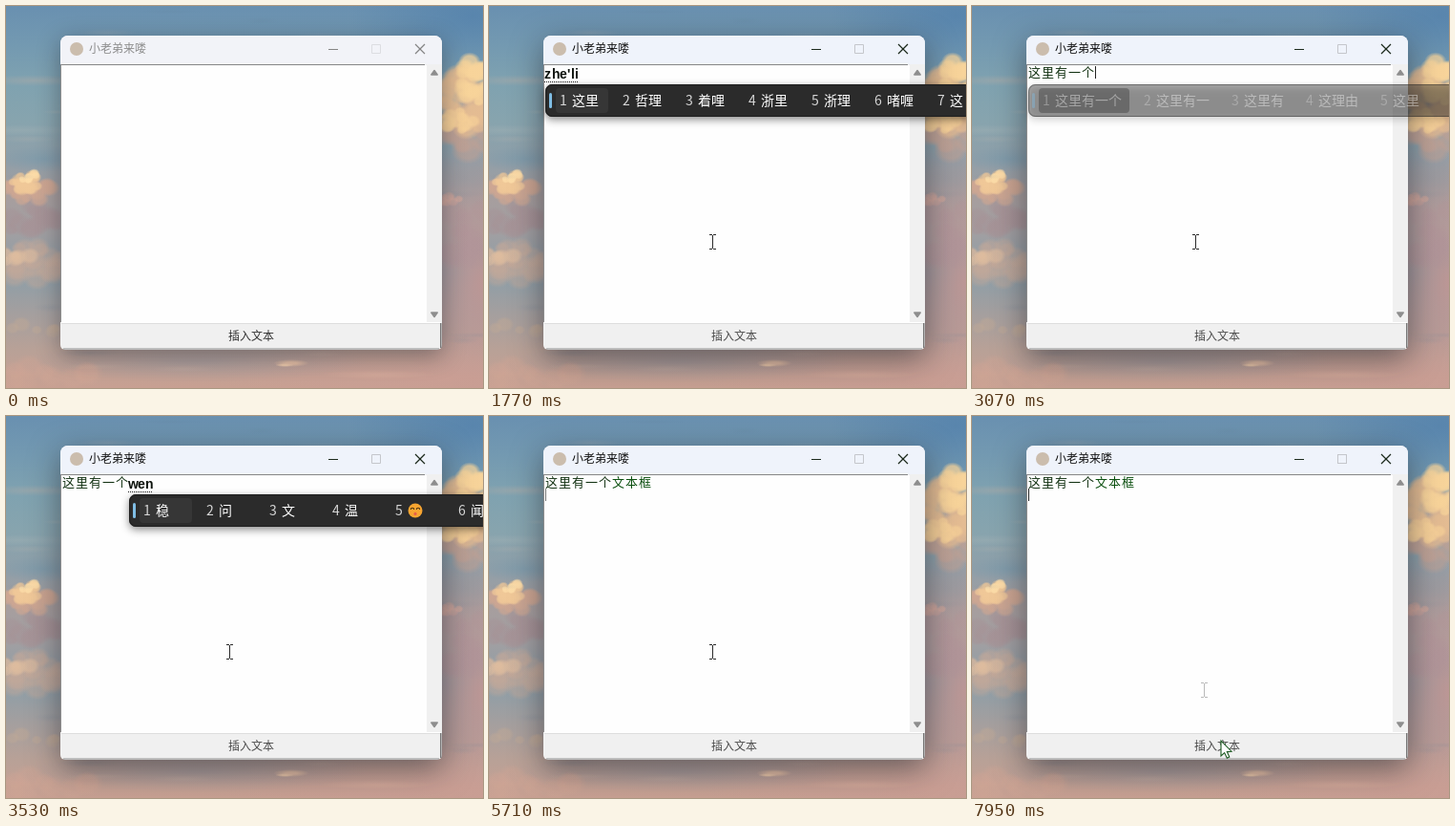
An HTML page with a canvas for the animation above (8000 ms loop, 500 px wide and 400 px high).

```html
<!DOCTYPE html>
<html lang="zh-CN">
<head>
<meta charset="utf-8">
<style>
html, body { margin: 0; width: 100%; height: 100%; overflow: hidden; background: #7d9cae; }
canvas { display: block; width: 500px; height: 400px; }
</style>
</head>
<body>
<canvas id="stage" width="500" height="400"></canvas>
<script>
const W = 500, H = 400, LOOP = 8000;
const ctx = document.getElementById('stage').getContext('2d');
const CJK = '"Noto Sans CJK SC", "Noto Sans CJK", sans-serif';
const clamp = v => Math.max(0, Math.min(1, v));
const lerp = (a, b, k) => a + (b - a) * k;

function rect(c, x, y, w, h, color) {
  c.fillStyle = color;
  c.fillRect(x, y, w, h);
}

function round(x, y, w, h, r, color) {
  ctx.fillStyle = color;
  ctx.beginPath();
  ctx.roundRect(x, y, w, h, r);
  ctx.fill();
}

function line(color, width, ...pts) {
  ctx.strokeStyle = color;
  ctx.lineWidth = width;
  ctx.beginPath();
  pts.forEach(([x, y], i) => i ? ctx.lineTo(x, y) : ctx.moveTo(x, y));
  ctx.stroke();
}

function text(s, x, y, size, color, spacing = 0) {
  ctx.font = `${size}px ${CJK}`;
  ctx.letterSpacing = spacing + 'px';
  ctx.fillStyle = color;
  ctx.fillText(s, x, y);
  ctx.letterSpacing = '0px';
}

// ---- painted sky ----
function makeSky() {
  const cv = document.createElement('canvas');
  cv.width = W;
  cv.height = H;
  const c = cv.getContext('2d');
  let seed = 11;
  const rnd = () => (seed = (seed * 16807) % 2147483647) / 2147483647;

  const g = c.createLinearGradient(0, 0, 0, H);
  ['#6990b0', '#7399b1', '#7fa2b0', '#87a4ae', '#8f9fa9', '#a79e9e', '#a09fa2',
   '#8c9ea8', '#a39f9f', '#b8a197', '#c8a092'].forEach((col, i) => g.addColorStop(i / 10, col));
  rect(c, 0, 0, W, H, g);

  function blob(x, y, rx, ry, rgb, a, hard = 0) {
    c.save();
    c.translate(x, y);
    c.scale(rx, ry);
    const r = c.createRadialGradient(0, 0, hard, 0, 0, 1);
    r.addColorStop(0, `rgba(${rgb},${a})`);
    r.addColorStop(1, `rgba(${rgb},0)`);
    c.fillStyle = r;
    c.beginPath();
    c.arc(0, 0, 1, 0, 7);
    c.fill();
    c.restore();
  }

  // cluster of overlapping dabs
  function puff(x, y, w, h, n, rgb, size, a) {
    for (let i = 0; i < n; i++) {
      const q = rnd() * 6.28, d = Math.sqrt(rnd()), s = size * (0.6 + rnd() * 0.7);
      blob(x + Math.cos(q) * d * w, y + Math.sin(q) * d * h, s * 1.2, s, rgb, a, 0.6);
    }
  }

  blob(490, 10, 130, 70, '84,130,172', 0.8);
  blob(500, 290, 90, 150, '190,150,148', 0.95);
  blob(480, 180, 60, 35, '150,152,158', 0.6);
  blob(460, 390, 240, 45, '203,158,148', 0.8);
  blob(200, 372, 180, 22, '150,150,158', 0.5);
  blob(30, 78, 55, 6, '160,168,170', 0.7);
  blob(15, 130, 60, 6, '152,172,178', 0.7);
  blob(40, 160, 50, 14, '118,152,170', 0.6);

  puff(18, 222, 40, 14, 16, '166,146,150', 11, 0.5);
  puff(22, 192, 24, 12, 20, '205,166,146', 8, 0.7);
  puff(22, 184, 17, 10, 18, '240,200,152', 6, 0.75);
  puff(24, 180, 10, 6, 8, '252,220,168', 4, 0.8);
  puff(25, 270, 36, 18, 20, '196,168,152', 11, 0.45);
  puff(10, 262, 18, 7, 8, '222,188,158', 7, 0.6);
  puff(20, 338, 42, 5, 9, '190,168,150', 7, 0.5);
  puff(30, 386, 70, 10, 12, '206,164,148', 12, 0.4);

  puff(484, 122, 32, 32, 30, '190,160,148', 12, 0.6);
  puff(486, 100, 26, 32, 34, '228,188,146', 10, 0.7);
  puff(492, 78, 16, 24, 22, '248,212,154', 8, 0.75);
  puff(476, 122, 16, 12, 14, '246,208,152', 6, 0.7);
  puff(466, 203, 9, 5, 7, '210,166,154', 5, 0.6);
  puff(486, 240, 25, 35, 14, '176,148,152', 13, 0.35);

  blob(299, 374, 19, 4, '228,190,164', 0.9, 0.3);
  blob(292, 376, 10, 2, '240,204,172', 0.8, 0.3);
  blob(390, 386, 60, 5, '216,172,156', 0.6);
  for (let i = 0; i < 60; i++) {
    blob(rnd() * W, rnd() * H, 14 + rnd() * 30, 2 + rnd() * 3,
      i % 2 ? '225,200,180' : '95,125,150', 0.12);
  }
  return cv;
}
const sky = makeSky();

// ---- window ----
function drawWindow(active) {
  ctx.save();
  ctx.shadowColor = active ? 'rgba(20,20,30,.5)' : 'rgba(20,20,30,.4)';
  ctx.shadowBlur = active ? 32 : 24;
  ctx.shadowOffsetY = active ? 9 : 6;
  round(57, 31, 400, 329, [8, 8, 5, 5], '#f0f0f0');
  ctx.restore();
  round(57, 31, 400, 30, [8, 8, 0, 0], active ? '#eff3fb' : '#f2f3f8');

  ctx.fillStyle = '#cbbdad';
  ctx.beginPath();
  ctx.arc(74, 45, 7, 0, 7);
  ctx.fill();
  text('小老弟来喽', 87, 49, 12, active ? '#111' : '#8c8c8c');

  const ink = active ? '#1c2a1c' : '#858585';
  line(ink, 1, [338, 45.5], [348, 45.5]);
  ctx.strokeStyle = active ? '#c4c6cb' : '#dcdde1';
  ctx.strokeRect(383.5, 40.5, 9, 9);
  line(ink, 1.15, [429, 40], [439, 50]);
  line(ink, 1.15, [439, 40], [429, 50]);

  rect(ctx, 58, 62, 383, 269, '#fefefe');
  rect(ctx, 57, 61, 382, 1, '#868686');
  rect(ctx, 57, 61, 1, 270, '#8d8d8d');
  rect(ctx, 441, 62, 16, 269, '#f0f0f0');
  for (const [y, d] of [[70, -1], [323, 1]]) {
    ctx.fillStyle = ctx.strokeStyle = '#8e8e8e';
    ctx.lineWidth = 1.5;
    ctx.lineJoin = 'round';
    ctx.beginPath();
    ctx.moveTo(445.8, y - d * 2);
    ctx.lineTo(452.2, y - d * 2);
    ctx.lineTo(449, y + d * 2.5);
    ctx.closePath();
    ctx.fill();
    ctx.stroke();
  }

  rect(ctx, 58, 331, 398, 1, '#fff');
  rect(ctx, 58, 332, 398, 1, '#dedede');
  rect(ctx, 455, 332, 1.5, 26, '#787878');
  rect(ctx, 60, 358.5, 394, 1, '#8c8c8c');
  text('插入文本', 233, 350, 12, active ? '#4c4c4c' : '#333');
}

// ---- input method ----
// [start, typed letters, candidates]
const FIRST = [
  [1060, 'z', '在 这 中 做 再 着 最'],
  [1210, 'zh', '这 中 只 找 着 真 种'],
  [1360, 'zhe', '这 着 者 折 哲 浙 遮'],
  [1530, "zhe'l", '这里 这类 这两 折了 这 着 者'],
  [1690, "zhe'li", '这里 哲理 着哩 浙里 浙理 啫喱 这'],
  [1910, "zhe'li'y", '这里有 这里 哲理 着哩 浙里 浙理'],
  [2030, "zhe'li'yo", '这里有 这里 哲理 着哩 浙里 浙理'],
  [2160, "zhe'li'you", '这里有 这理由 这里 哲理 着哩 浙里'],
  [2390, "zhe'li'you'y", '这里有一 这里有 这理由 这里 哲理'],
  [2460, "zhe'li'you'yi", '这里有一 _ 这里有一个 这里有 这理由 这里'],
  [2690, "zhe'li'you'yi'g", '这里有一个 这里有一 这里有 这理由 这里'],
  [2840, "zhe'li'you'yi'ge", '这里有一个 这里有一 这里有 这理由 这里']
];
const SECOND = [
  [3200, 'w', '我 为 无 问 万 外 完'],
  [3330, 'we', '我 为 未 位 文 问 委'],
  [3450, 'wen', '稳 问 文 温 @ 闻 吻'],
  [3620, "wen'b", '文本 稳吧 问吧 稳 问 文'],
  [3700, "wen'be", '文本 问本 稳 问 文 温'],
  [3780, "wen'ben", '文本 问本 稳 问 文 温'],
  [4080, "wen'ben'k", '文本框 文本库 文本 稳 问 文']
];
const advance = ch => ch === 'w' ? 10 : "'li".includes(ch) ? 4 : 8;

function drawLetters(s, x) {
  const start = x;
  ctx.font = 'bold 14px "Liberation Sans", Arial, sans-serif';
  ctx.fillStyle = '#0c120c';
  for (const ch of s) {
    ctx.fillText(ch, x, 76);
    x += advance(ch);
  }
  for (let i = start; i < x; i += 2) rect(ctx, i, 79, 1, 1, '#222');
  return x;
}

function drawFace(x, y) {
  ctx.fillStyle = '#f7a531';
  ctx.beginPath();
  ctx.arc(x, y, 7.5, 0, 7);
  ctx.fill();
  ctx.strokeStyle = '#4a3212';
  ctx.lineWidth = 1.1;
  for (const dx of [-3, 3]) {
    ctx.beginPath();
    ctx.arc(x + dx, y - 1, 1.7, Math.PI, 0);
    ctx.stroke();
  }
  ctx.fillStyle = '#e5604b';
  ctx.beginPath();
  ctx.arc(x, y + 3.4, 1.6, 0, 7);
  ctx.fill();
}

function drawPopup(x, list, alpha) {
  if (alpha <= 0) return;
  ctx.save();
  ctx.globalAlpha = alpha;
  ctx.save();
  ctx.shadowColor = 'rgba(0,0,0,.45)';
  ctx.shadowBlur = 9;
  ctx.shadowOffsetY = 3;
  round(x, 82, 560, 34, 7, '#2b2b2b');
  ctx.restore();
  ctx.strokeStyle = '#1e1e1e';
  ctx.lineWidth = 1;
  ctx.beginPath();
  ctx.roundRect(x + 0.5, 82.5, 560, 33, 7);
  ctx.stroke();
  let nx = x + 15;
  list.split(' ').forEach((word, i) => {
    const pitch = Math.max(66, 36 + 14 * word.length);
    if (!i) {
      round(x + 11, 86, pitch - 11, 26, 4, '#363636');
      round(x + 4, 91, 3, 16, 1.5, '#7fbde4');
    }
    text(i + 1, nx, 104, 14, '#d6d6d6');
    if (word === '@') drawFace(nx + 21, 99);
    else if (word !== '_') text(word, nx + 13, 104, 14, '#fff');
    nx += pitch;
  });
  ctx.restore();
}

function compose(t, steps, x, end) {
  if (t < steps[0][0] || t > end + 120) return;
  const [, letters, list] = steps.filter(s => s[0] <= t).pop();
  if (t < end) {
    const right = drawLetters(letters, x);
    if (t >= 4370) rect(ctx, right, 64, 1, 16, '#111');
  }
  drawPopup(x + 1, list, Math.min(clamp((t - steps[0][0] + 20) / 90), clamp((end + 120 - t) / 120)));
}

// ---- caret and pointer ----
function drawCaret(t) {
  if (t >= 390 && t < 1060) {
    if (t < 700 || t >= 920) rect(ctx, 59, 63, 1, 13, '#222');
  } else if (t >= 3000 && t < 3200) {
    rect(ctx, 129, 63, 1, 13, '#222');
  } else if (t >= 4550) {
    const on = (t - 4760 + 900) % 900 < 580 || t < 4760;
    if (!on) return;
    if (t < 4990) rect(ctx, 171, 63, 1, 13, '#222');
    else rect(ctx, 59, 76, 1, 13, t > 5600 && t < 6300 ? '#777' : '#222');
  }
}

function drawBeam(x, y, color) {
  for (const d of [-8, 7]) {
    rect(ctx, x - 3, y + d, 3, 1, color);
    rect(ctx, x + 1, y + d, 3, 1, color);
  }
  rect(ctx, x, y - 7, 1, 14, color);
}

function drawArrow(x, y) {
  ctx.fillStyle = '#fff';
  ctx.strokeStyle = '#1d5b22';
  ctx.lineWidth = 1.1;
  ctx.lineJoin = 'miter';
  ctx.beginPath();
  [[0, 0], [0, 16], [3.7, 12.6], [6.3, 18.2], [8.8, 17], [6.3, 11.6], [11, 11.2]]
    .forEach(([dx, dy]) => ctx.lineTo(x + dx, y + dy));
  ctx.closePath();
  ctx.fill();
  ctx.stroke();
}

function drawPointer(t) {
  if (t < 150) return;
  const s = 7180 + Math.floor((t - 7180) / 77) * 77;
  const a = clamp((s - 7180) / 231), b = clamp((s - 7411) / 200);
  const x = Math.round(lerp(lerp(234, 243, a), 261, b));
  const y = Math.round(lerp(lerp(247, 287, a), 340, b));
  if (b > 0) drawBeam(243, 287, '#b9b9b9');
  if (y < 331) drawBeam(x, y, '#2a2a2a');
  else drawArrow(x, y);
}

function draw(t) {
  ctx.drawImage(sky, 0, 0);
  drawWindow(t >= 310);
  if (t >= 3000) text('这里有一个', 59, 74, 13, '#153415', 1);
  if (t >= 4550) text('文本框', 129, 74, 13, '#0a4f0e', 1);
  drawCaret(t);
  compose(t, FIRST, 58, 3000);
  compose(t, SECOND, 128, 4550);
  drawPointer(t);
}

const start = performance.now();
function tick() {
  draw((performance.now() - start) % LOOP);
  requestAnimationFrame(tick);
}
draw(0);
requestAnimationFrame(tick);
</script>
</body>
</html>
```
